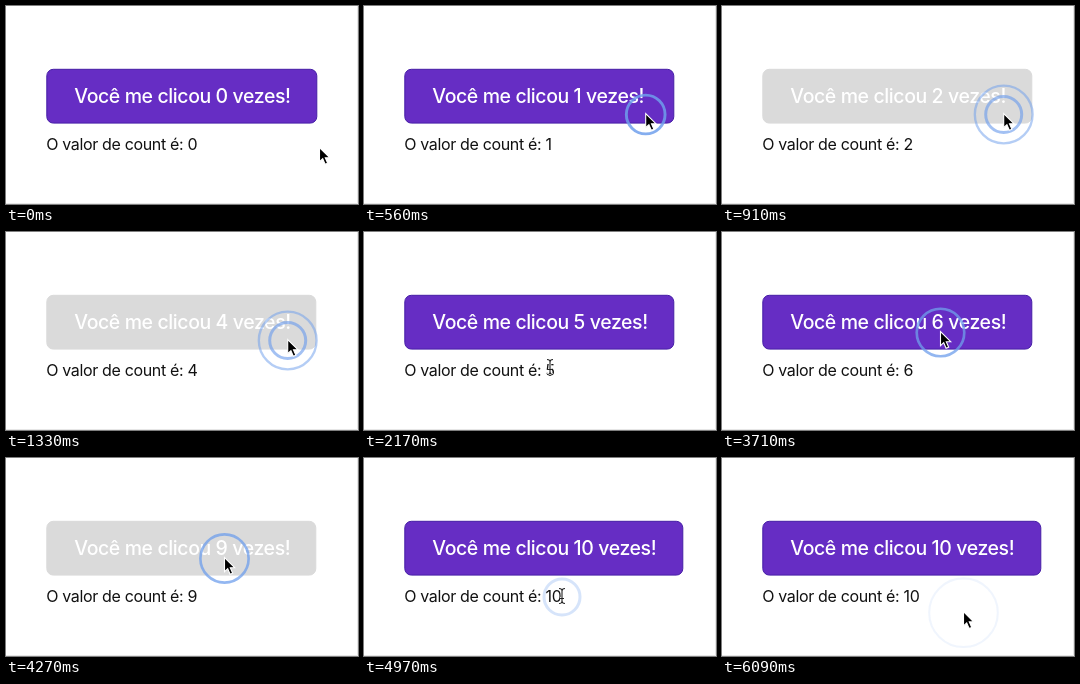
Recreate the animation shown at these times as an HTML page. Size 352 by 198 pixels, loop 6160 ms.

```html
<!DOCTYPE html>
<html lang="pt">
<head>
<meta charset="utf-8">
<title>Contador de cliques</title>
<style>
  html, body { margin: 0; width: 100%; height: 100%; overflow: hidden; background: #fff; }
  svg { display: block; width: 352px; height: 198px; }
  text { font-family: Inter, Roboto, sans-serif; white-space: pre; }
  #label { font-size: 19.5px; font-weight: 450; letter-spacing: -.41px; fill: #fff; }
  #value { font-size: 16px; letter-spacing: -.34px; fill: #111; }
  #box { fill: #662dc4; stroke: #451da6; }
  .down #box { fill: #dadada; stroke: #dadada; }
  #rings circle { fill: none; stroke: #6f9fec; }
  .halo { stroke: #fff; stroke-width: 2.6; }
  .ink { stroke: #222; stroke-width: 1.1; }
</style>
</head>
<body>
<svg viewBox="0 0 352 198">
  <defs>
    <path id="stem" d="M-3 -7.5Q0 -7.5 0 -5Q0 -7.5 3 -7.5M0 -5V5M-3 7.5Q0 7.5 0 5Q0 7.5 3 7.5M-2 2.5H2"/>
  </defs>
  <path d="M0 197.5H351.5V0" fill="none" stroke="#e6e6e6"/>
  <g id="button">
    <rect id="box" x="40.8" y="63.3" height="53.8" rx="6.5"/>
    <text id="label" x="68.3" y="97"></text>
  </g>
  <text id="value" x="40.2" y="143.5"></text>
  <g id="rings"></g>
  <path id="arrow" d="M0 0V14.2L3.2 11.2L5.6 16.8L8.2 15.7L5.8 10.2H10.2Z" stroke="#fff" stroke-width="1.1"/>
  <g id="beam" fill="none">
    <use href="#stem" class="halo"/>
    <use href="#stem" class="ink"/>
  </g>
</svg>
<script>
const LOOP = 6160, STEP = 70;
const MOVE = 390, HOLD = 95, FADE_IN = 60, SPREAD = 250;
const $ = id => document.getElementById(id);

// Each scene: the pointer sets off at `at`, then clicks `n` times; `click` is the first release.
const home = { x: 313.5, y: 141.5 };
const scenes = [
  { at: 70, x: 281.7, y: 107.5, click: 540, n: 5, every: 210, counts: true },
  { at: 1700, x: 186, y: 135, click: 2420, n: 2, every: 640 },
  { at: 3130, x: 218.5, y: 99.5, click: 3625, n: 5, every: 185, counts: true },
  { at: 4450, x: 198, y: 138, click: 5045, n: 1 },
  { at: 5330, x: 241.5, y: 153.7, click: 5850, n: 1 }
];

const clamp = p => Math.max(0, Math.min(1, p));
const ease = p => p * p * (3 - 2 * p);

function pointer(t) {
  let { x, y } = home;
  for (const s of scenes) {
    const p = ease(clamp((t - s.at) / MOVE));
    x += (s.x - x) * p;
    y += (s.y - y) * p;
  }
  return [x, y];
}

function makeClick(scene, i) {
  const up = scene.click + i * (scene.every || 0);
  const ring = document.createElementNS("http://www.w3.org/2000/svg", "circle");
  ring.setAttribute("cx", scene.x);
  ring.setAttribute("cy", scene.y + 1);
  $("rings").append(ring);
  return { up, down: up - HOLD, counts: scene.counts, ring };
}

const clicks = scenes.flatMap(s => Array.from({ length: s.n }, (_, i) => makeClick(s, i)));
const buttonClicks = clicks.filter(c => c.counts);

function drawRing({ down, up, ring }, t) {
  const p = clamp((t - up) / SPREAD);
  const alpha = p < 1 ? clamp((t - down) / FADE_IN) * (1 - .95 * p * p) : 0;
  ring.setAttribute("r", 18 + 17 * p);
  ring.setAttribute("stroke-width", 3 - p);
  ring.setAttribute("opacity", alpha * .85);
}

function place(id, x, y, shown) {
  $(id).setAttribute("transform", `translate(${x} ${y})`);
  $(id).setAttribute("visibility", shown ? "visible" : "hidden");
}

function draw(t) {
  const count = buttonClicks.filter(c => c.up <= t).length;
  const held = buttonClicks.some(c => c.down <= t && t < c.up);
  const [x, y] = pointer(t);
  const overText = x < 201 && y > 126 && y < 147;

  $("label").textContent = `Você me clicou ${count} vezes!`;
  $("value").textContent = `O valor de count é: ${count}`;
  $("box").setAttribute("width", count > 9 ? 278 : count ? 269 : 270);
  $("button").classList.toggle("down", held);
  clicks.forEach(c => drawRing(c, t));
  place("arrow", x, y, !overText);
  place("beam", x, y, overText);
}

const start = performance.now();
function tick() {
  const t = (performance.now() - start) % LOOP;
  draw(Math.floor(t / STEP) * STEP);
  requestAnimationFrame(tick);
}
tick();
</script>
</body>
</html>
```
